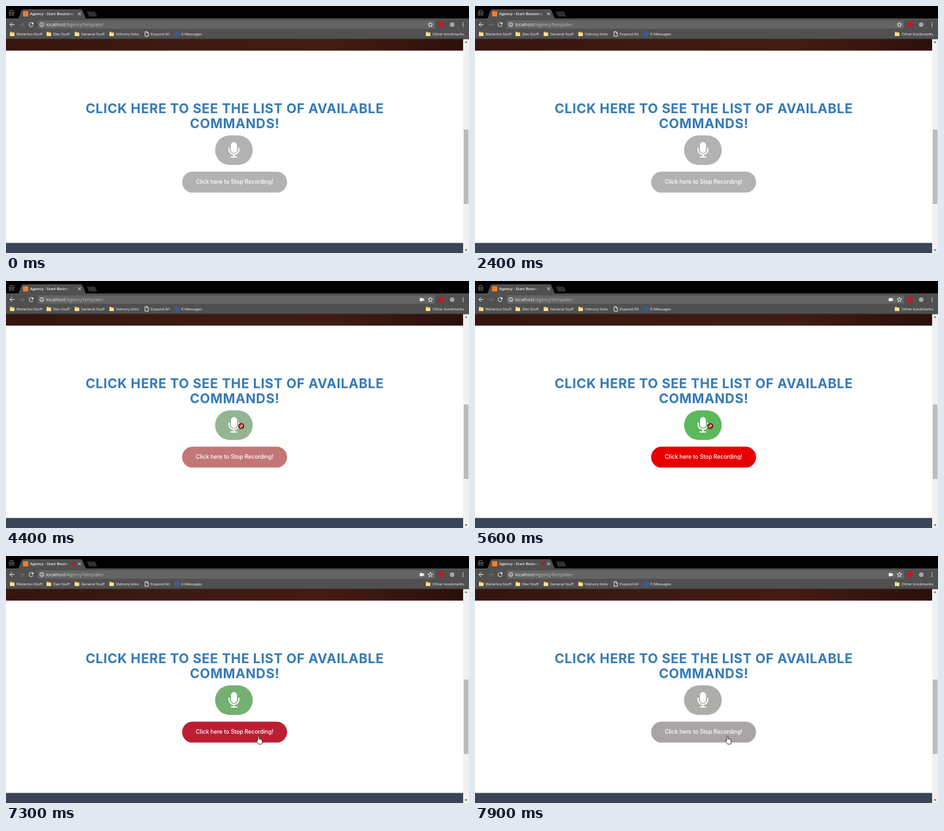
These frames come from a looping animation (708x378 px, 8000 ms). An HTML page:

```html
<!DOCTYPE html>
<html lang="en">
<head>
<meta charset="utf-8">
<title>Voice commands</title>
<style>
  html, body { margin: 0; width: 100%; height: 100%; overflow: hidden; background: #fff; }
  svg { display: block; width: 708px; height: 378px; }
  text { font-family: "Open Sans", sans-serif; fill: #f4f4f4; white-space: pre; }
  .tab { font-size: 5.9px; font-weight: 600; }
  .url { font-size: 7px; }
  .mark { font-size: 5.9px; }
  .head { font: 700 20px Inter, sans-serif; letter-spacing: .6px; fill: #337ab7; text-anchor: middle; }
  .stop { font: 500 8.55px Inter, sans-serif; fill: #fff; text-anchor: middle; }
  .line { fill: none; stroke: #e8e8e8; stroke-width: 1; }
</style>
</head>
<body>
<svg viewBox="0 0 708 378">
  <defs>
    <linearGradient id="wood">
      <stop offset="0" stop-color="#35150e"/>
      <stop offset=".35" stop-color="#3d1a12"/>
      <stop offset=".7" stop-color="#441c12"/>
      <stop offset="1" stop-color="#2b100b"/>
    </linearGradient>
    <linearGradient id="fade">
      <stop offset="0" stop-color="#505050" stop-opacity="0"/>
      <stop offset="1" stop-color="#505050"/>
    </linearGradient>
    <clipPath id="titleClip"><rect id="titleBox" x="36" y="5" width="68" height="14"/></clipPath>
    <g id="folder">
      <path d="M0 .4h3l.8 1H7V7H0z" fill="#e9c75c"/>
      <path d="M0 2.4h7V7H0z" fill="#fbe08a"/>
    </g>
  </defs>

  <!-- page -->
  <rect width="708" height="378" fill="#fff"/>
  <rect y="50" width="699" height="18.3" fill="url(#wood)"/>
  <rect y="362.6" width="699" height="16" fill="#3b4557"/>
  <text class="head" x="349.8" y="164">CLICK HERE TO SEE THE LIST OF AVAILABLE</text>
  <text class="head" x="349.8" y="186.7">COMMANDS!</text>
  <rect id="mic" x="319.7" y="198" width="57.6" height="45.3" rx="22.6"/>
  <g fill="none" stroke="#fff" stroke-width="1.9" stroke-linecap="round">
    <rect x="344" y="208.3" width="9.2" height="16.6" rx="4.6" fill="#fff" stroke="none"/>
    <path d="M341.2 217.5v2.3a7.4 7.4 0 0 0 14.8 0v-2.3M348.6 227.5v3.6M344.4 231.1h8.4"/>
  </g>
  <rect id="stop" x="269.3" y="253.6" width="160.5" height="32" rx="16"/>
  <text class="stop" x="349.6" y="272.1">Click here to Stop Recording!</text>

  <!-- scrollbar -->
  <rect x="699" y="50" width="9" height="328" fill="#f1f1f1"/>
  <rect x="700" y="189" width="7.2" height="114" fill="#bcbcbc"/>
  <path d="M701.6 56.3l2-2.4 2 2.4zM701.6 372.6l2 2.4 2-2.4z" fill="#505050"/>

  <!-- window frame and tab -->
  <rect width="708" height="20" fill="#000"/>
  <g class="line" style="stroke:#8c8c8c">
    <path d="M4 10.6h9M6 9.5l.6-2.6h4l.6 2.6" stroke-width=".9"/>
    <circle cx="6.3" cy="13.4" r="1.4" stroke-width=".8"/>
    <circle cx="10.7" cy="13.4" r="1.4" stroke-width=".8"/>
  </g>
  <path d="M17 20q2-.5 3-3l3.600-10q1-2 3-2H114q2 0 3 2l4 10q1 2.500 3 3z" fill="#505050"/>
  <path d="M123.500 8.500h11q1.500 0 2 1.200l2.800 6.300h-11q-1.500 0-2-1.200z" fill="#303030"/>
  <rect x="26" y="8" width="8" height="8" rx="1.300" fill="#f27c2b"/>
  <g clip-path="url(#titleClip)">
    <text class="tab" x="37" y="14">Agency - Start Bootstrap</text>
    <rect id="titleFade" x="96" y="6" width="9" height="12" fill="url(#fade)"/>
  </g>
  <circle id="dot" cx="104" cy="12" r="2.900" fill="#c60f18"/>
  <path class="line" d="M110.300 9.800l4.200 4.200m0-4.200l-4.200 4.200" stroke-width=".9"/>

  <!-- toolbar -->
  <rect y="19" width="708" height="31.500" fill="#505050"/>
  <rect x="48.500" y="22" width="607.500" height="12.800" rx="1.300" fill="#646464"/>
  <path class="line" d="M13 28.400H6m3.400-3.400L6 28.400l3.400 3.400" stroke-width="1.100"/>
  <path class="line" d="M20.500 28.400h7m-3.400-3.400l3.400 3.400-3.400 3.400" style="stroke:#737373"/>
  <path class="line" d="M41 26.300a3.200 3.200 0 1 0 .6 3"/>
  <path d="M42 24.600v3.300h-3.300z" fill="#e8e8e8"/>
  <circle class="line" cx="54.800" cy="28.400" r="3" stroke-width=".7"/>
  <path class="line" d="M54.800 26.600v.8m0 .7v2.100" stroke-width=".8"/>
  <text class="url" x="61.300" y="30.900">localhost<tspan fill="#b9b9b9">/AgencyTemplate/</tspan></text>
  <path id="camera" d="M632.700 26h4.600v1.600l2-1.400v4.600l-2-1.400V31h-4.600z" fill="#f0f0f0"/>
  <path class="line" d="M649 24.900l1 2.400 2.600.2-2 1.700.6 2.500-2.200-1.400-2.200 1.400.6-2.500-2-1.700 2.600-.2z" stroke-width=".8"/>
  <circle cx="665.500" cy="28.400" r="4.200" fill="#d3121d"/>
  <circle cx="682.300" cy="28.600" r="3.500" fill="#a6a6a6"/>
  <g fill="#e8e8e8">
    <circle cx="699" cy="25.700" r=".8"/><circle cx="699" cy="28.400" r=".8"/><circle cx="699" cy="31.100" r=".8"/>
  </g>

  <!-- bookmarks -->
  <g id="marks"></g>
  <path class="line" d="M212.700 39.300h3.200l1.900 1.900v5h-5.100zM215.700 39.300v2h2" stroke-width=".8"/>
  <rect x="258" y="39.200" width="7" height="7" rx=".8" fill="#3b5998"/>
  <path d="M0 50.200H708" stroke="#303030" stroke-width=".7"/>

  <!-- pointers -->
  <path id="arrow" d="M0 0V12.200l2.800-2.600 2 4.500 1.900-.8-2-4.400h3.800z" fill="#fff" stroke="#000" stroke-width=".7"/>
  <path id="hand" d="M2.500 7.600V1.600q0-1.100 1-1.100t1 1.100V5q1.200-.4 1.700.4 1.300-.3 1.700.5 1.400-.2 1.400 1.300v2.300q0 2-1 3.500H4Q2.600 11.200.6 8.700.2 7.300 1.600 7.100z" fill="#fff" stroke="#111" stroke-width=".8"/>
  <g id="deny" fill="none">
    <circle r="3.500" fill="#fff" stroke="#3a0508" stroke-width="2.200"/>
    <path d="M-2.500-2.500l5 5" stroke="#b5121c" stroke-width="1.500"/>
    <circle r="3.500" stroke="#b5121c" stroke-width="1.300"/>
  </g>
</svg>
<script>
const LOOP = 8000, STEP = 100;
const $ = id => document.getElementById(id);

// label, text x, folder x
const marks = [
  ["Waterloo Stuff", 16, 6], ["Dev Stuff", 72.3, 62], ["General Stuff", 114.8, 105],
  ["Vidnory links", 168, 158], ["Expand All", 221.3], ["0 Messages", 268],
  ["Other bookmarks", 652.3, 642]
];
$("marks").innerHTML = marks.map(([label, x, icon]) =>
  (icon ? `<use href="#folder" x="${icon}" y="39"/>` : "") +
  `<text class="mark" x="${x}" y="45">${label}</text>`).join("");

// time, mic colour, stop colour
const colours = [
  [4100, 0xb2b2b2, 0xb2b2b2], [4200, 0xa8b3a8, 0xb8a0a0], [4300, 0xa8b3a8, 0xb8a0a0],
  [4500, 0x80b680, 0xcf4b4b], [4800, 0x5cb85c, 0xe80000], [7000, 0x5cb85c, 0xe80000],
  [7100, 0x5eb85d, 0xe40003], [7300, 0x74b072, 0xbc1f34], [7500, 0x91b08f, 0xb25a66],
  [7700, 0xa1af9f, 0xad8a90], [7900, 0xabaea9, 0xaba4a7]
];

const glow = [[4400, 0], [4800, .8], [5100, .75], [5300, .6], [5600, .06], [6100, .7],
  [6600, .25], [7000, .65], [7900, .75]];

// time, pointer, left/top of the pointer
const moves = [
  [0, ""], [2800, "arrow", 416, 66], [2900, "hand", 404, 148], [3000, "arrow", 383, 229],
  [3100, "arrow", 377, 222], [3400, "hand", 370, 220], [3600, "hand", 361, 218],
  [3700, "hand", 355.5, 217], [4400, "deny", 359.7, 222],
  [6200, "deny", 361, 226], [6300, "deny", 364, 234], [6400, "arrow", 367, 245],
  [6500, "hand", 371, 256], [6600, "hand", 376, 265], [6700, "hand", 380, 271],
  [6800, "hand", 382, 274], [6900, "hand", 382.5, 275]
];

function span(keys, t) {
  let i = 0;
  while (i < keys.length - 2 && t >= keys[i + 1][0]) i++;
  const [a, b] = [keys[i], keys[i + 1]];
  return [a, b, Math.min(1, Math.max(0, (t - a[0]) / (b[0] - a[0])))];
}
const mix = (a, b, k) => a + (b - a) * k;
const mixColour = (a, b, k) =>
  `rgb(${[16, 8, 0].map(s => Math.round(mix(a >> s & 255, b >> s & 255, k)))})`;

function draw(t) {
  const [a, b, k] = span(colours, t);
  $("mic").setAttribute("fill", mixColour(a[1], b[1], k));
  $("stop").setAttribute("fill", mixColour(a[2], b[2], k));

  const [g, h, m] = span(glow, t);
  $("dot").setAttribute("opacity", mix(g[1], h[1], m));
  $("camera").setAttribute("opacity", t >= 4200 ? 1 : 0);
  const short = t >= 4400;
  $("titleBox").setAttribute("width", short ? 61 : 68);
  $("titleFade").setAttribute("x", short ? 88 : 96);

  const [, kind, x, y] = moves.findLast(p => p[0] <= t);
  for (const id of ["arrow", "hand", "deny"]) {
    const on = id === kind;
    $(id).setAttribute("visibility", on ? "visible" : "hidden");
    if (on) $(id).setAttribute("transform", `translate(${x} ${y})`);
  }
}

const start = performance.now();
function tick() {
  const t = (performance.now() - start) % LOOP;
  draw(Math.floor(t / STEP) * STEP);
  requestAnimationFrame(tick);
}
tick();
</script>
</body>
</html>
```
